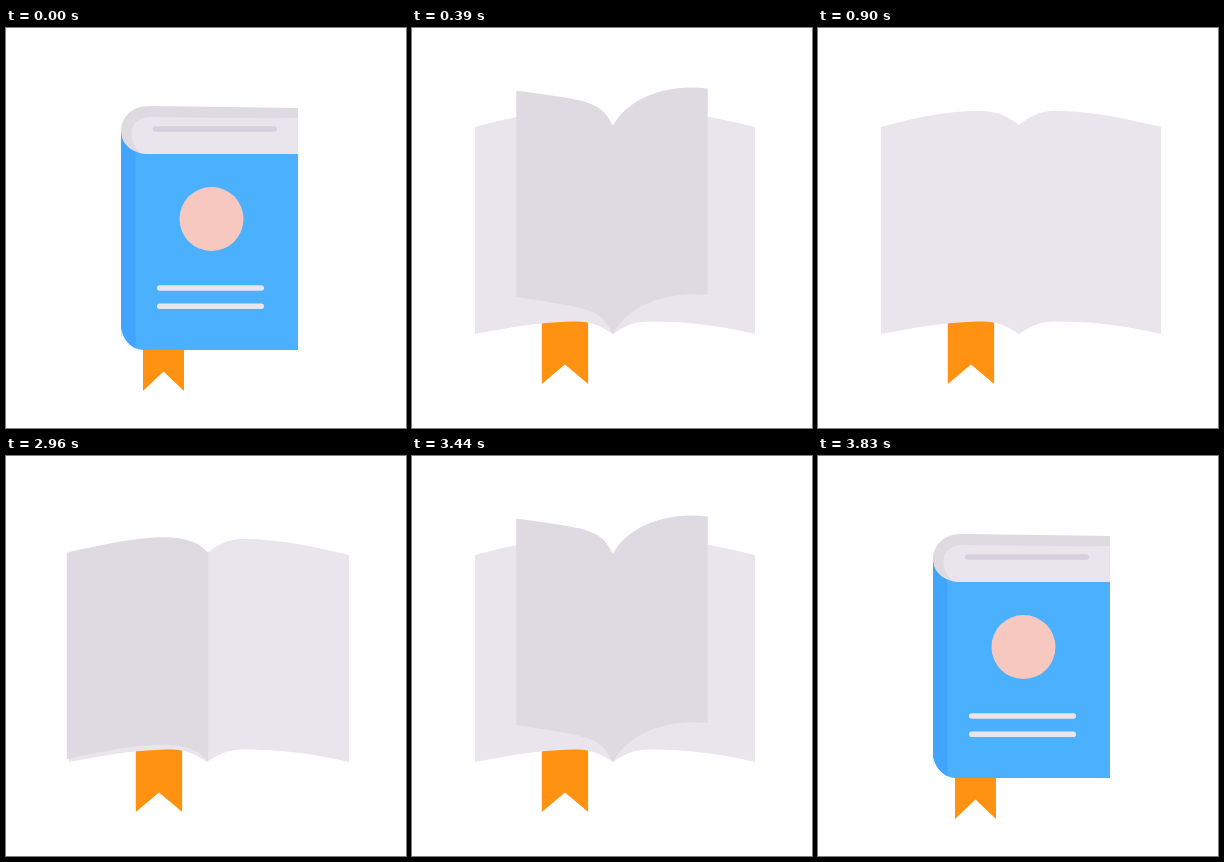
Recreate the animation shown at these times as an HTML page with a canvas. Size 400 px wide and 400 px high, loop 5360 ms.

```html
<!DOCTYPE html>
<html lang="en">
<head>
<meta charset="utf-8">
<title>Opening book</title>
<style>
  html, body { margin: 0; width: 100%; height: 100%; overflow: hidden; background: #fff; }
  canvas { display: block; width: 100vmin; height: 100vmin; }
</style>
</head>
<body>
<canvas id="stage" width="400" height="400"></canvas>
<script>
const ctx = document.getElementById('stage').getContext('2d');
const LOOP = 5360, STEP = 30, STEPS = 30, CLOSE_AT = 2960, TURN = 12;
const PAGE = '#eae5ec', SHADE = '#dfd9e2', LINE = '#d6cfdd';
const BLUE = '#4bb1ff', SPINE = '#42a5fd', ORANGE = '#ff9311', PINK = '#f7c8c0';
const PAGE_STARTS = [5, 9, 13, 18];

const clamp = v => Math.min(1, Math.max(0, v));
const ease = v => v * v * (3 - 2 * v);
const mix = (a, b, u) => a + (b - a) * u;

function fill(color, d) {
  ctx.fillStyle = color;
  ctx.fill(new Path2D(d));
}

function rule(color, x1, x2, y) {
  ctx.strokeStyle = color;
  ctx.lineWidth = 5.6;
  ctx.lineCap = 'round';
  ctx.stroke(new Path2D(`M${x1 + 2.8} ${y}H${x2 - 2.8}`));
}

function bookmark(u, angle, spineX) {
  const turn = Math.cos(Math.PI * u) + 0.12 * Math.sin(angle);
  const size = turn * mix(1, 1.13, u);
  const x = spineX + 42.5 * size, half = 20.5 * Math.abs(size);
  const end = mix(363, 356, u);
  fill(ORANGE, `M${x - half} 285H${x + half}V${end}L${x} ${end - 19.5}L${x - half} ${end}Z`);
}

// Inside of the front cover, swinging out to the left.
function leftHalf(angle, spineX, spineY) {
  const k = -Math.cos(angle), m = -0.27 * Math.sin(angle);
  ctx.save();
  ctx.transform(k, m, 0, 1, spineX - 201 * k, spineY - 97 - 201 * m);
  fill(PAGE, `M201 97C190 89 182 83 160 83C130 83 100 89 63 99V306
    C100 299 130 294 160 293.5C182 293 190 299 201 306Z`);
  ctx.restore();
}

function rightHalf(u, spineX, spineY) {
  const peakX = mix(143, 237, u), peakY = mix(78, 83, u);
  const edgeX = mix(292, 343, u), edgeY = 80 + 19 * u ** 1.6;
  const c1x = spineX + 9 * u, c1y = 90, c2x = mix(125, 220, u);
  const bend = peakX + (edgeX - peakX) * 0.36;
  const bendY = mix(mix(peakY, edgeY, 0.36), peakY, u);
  const nearX = peakX + (edgeX - peakX) * 0.69;
  const nearY = mix(mix(peakY, edgeY, 0.69), 91, u);
  const low = 207 + 3.5 * u;
  const bottom = `V${edgeY + 207}C${nearX} ${nearY + 207} ${bend} ${bendY + low} ${peakX} ${peakY + low}
    C${c2x} ${peakY + low} ${c1x} ${c1y + 210} ${spineX} ${spineY + 209}Z`;
  const rim = 11 * clamp((1 - u) * 1.6);
  fill(rim ? SHADE : PAGE, `M${spineX} ${spineY}C${c1x} ${c1y} ${c2x} ${peakY} ${peakX} ${peakY}
    C${bend} ${bendY} ${nearX} ${nearY} ${edgeX} ${edgeY}` + bottom);
  if (!rim) return;
  const inX = spineX + rim * 0.95;
  fill(PAGE, `M${inX} ${spineY + 2}C${inX} ${spineY - 8} ${c2x + rim * 0.8} ${peakY + rim} ${peakX + 2} ${peakY + rim}
    C${bend} ${bendY + rim} ${nearX} ${nearY + rim} ${edgeX} ${edgeY + rim * 0.92}` +
    bottom.replace('Z', `L${spineX + rim * 1.8} 126Q${inX} 117 ${inX} ${spineY + 2}Z`));
}

function cover(angle, spineX, spineY) {
  const c = Math.cos(angle), s = Math.sin(angle);
  const width = 15 + 162 * c + 2 * s, edge = spineX + width;
  const top = Math.min(28, width * 0.5), foot = Math.min(23, width * 0.24);
  const outline = new Path2D(`M${spineX} ${spineY}
    C${spineX} ${spineY + 15} ${spineX + top * 0.46} ${126 + 2 * s} ${spineX + top} ${126 + 5 * s}
    L${edge} ${126 + 9 * s}V${322 + 15 * s}L${spineX + foot} ${322 - 2 * s}
    C${spineX + foot * 0.45} ${322 - 4 * s} ${spineX} ${310 + 3 * s} ${spineX} ${296 + 6 * s}Z`);
  ctx.save();
  ctx.clip(outline);
  ctx.fillStyle = BLUE;
  ctx.fillRect(spineX, 90, width, 260);
  ctx.fillStyle = SPINE;
  ctx.fillRect(spineX, 90, 14.5, 260);
  ctx.restore();

  ctx.save();
  ctx.transform(c, 0.166 * s, 0, 1, spineX, -18.6 * s);
  ctx.fillStyle = PINK;
  ctx.beginPath();
  ctx.arc(90.5, 191, 32, 0, 7);
  ctx.fill();
  rule(PAGE, 36, 143, 260);
  rule(PAGE, 36, 143, 278.3);
  ctx.restore();
}

function turningPage(u) {
  const angle = Math.PI * u, c = Math.cos(angle), s = Math.sin(angle);
  const settle = u ** 30 * 3.5;
  const x = 201 + settle * 0.6, y = 98 - settle * 0.6;
  const tipX = 200 + 139.5 * c, tipY = 97 - 61 * s ** (1.5 + 0.4 * u);
  const ax = x + 18 * c, ay = y - 20 - 7 * s;
  const bx = x + 53 * c + 18 * s, by = y - 21 - 18 * s * (1 + c);
  const h = 207.5;
  fill(SHADE, `M${x} ${y}C${ax} ${ay} ${bx} ${by} ${tipX} ${tipY}V${tipY + h - 1}
    C${bx} ${by + h} ${ax} ${ay + h} ${x} ${y + h + 1}Z`);
}

function draw(step) {
  const progress = clamp(step / TURN), u = ease(progress), angle = Math.PI * progress;
  const spineX = mix(115, 201, u), spineY = 103 - 6 * u + 4.3 * Math.sin(angle) * (1 - u) * 1.6;
  ctx.fillStyle = '#fff';
  ctx.fillRect(0, 0, 400, 400);
  bookmark(u, angle, spineX);
  if (progress > 0.5) leftHalf(angle, spineX, spineY);
  rightHalf(u, spineX, spineY);
  if (step < 5) {
    const c = Math.cos(angle);
    rule(LINE, spineX + 32 * c, spineX + 156 * c, 101);
  }
  if (progress <= 0.5) cover(angle, spineX, spineY);
  for (const start of PAGE_STARTS) {
    const t = (step - start) / TURN;
    if (t > 0 && t < 1) turningPage(ease(t));
  }
}

function stepAt(time) {
  if (time < CLOSE_AT) return Math.min(STEPS, Math.floor(time / STEP));
  return Math.max(0, STEPS - 1 - Math.floor((time - CLOSE_AT) / STEP));
}

const startTime = performance.now();
function frame() {
  draw(stepAt((performance.now() - startTime) % LOOP));
  requestAnimationFrame(frame);
}
frame();
</script>
</body>
</html>
```
